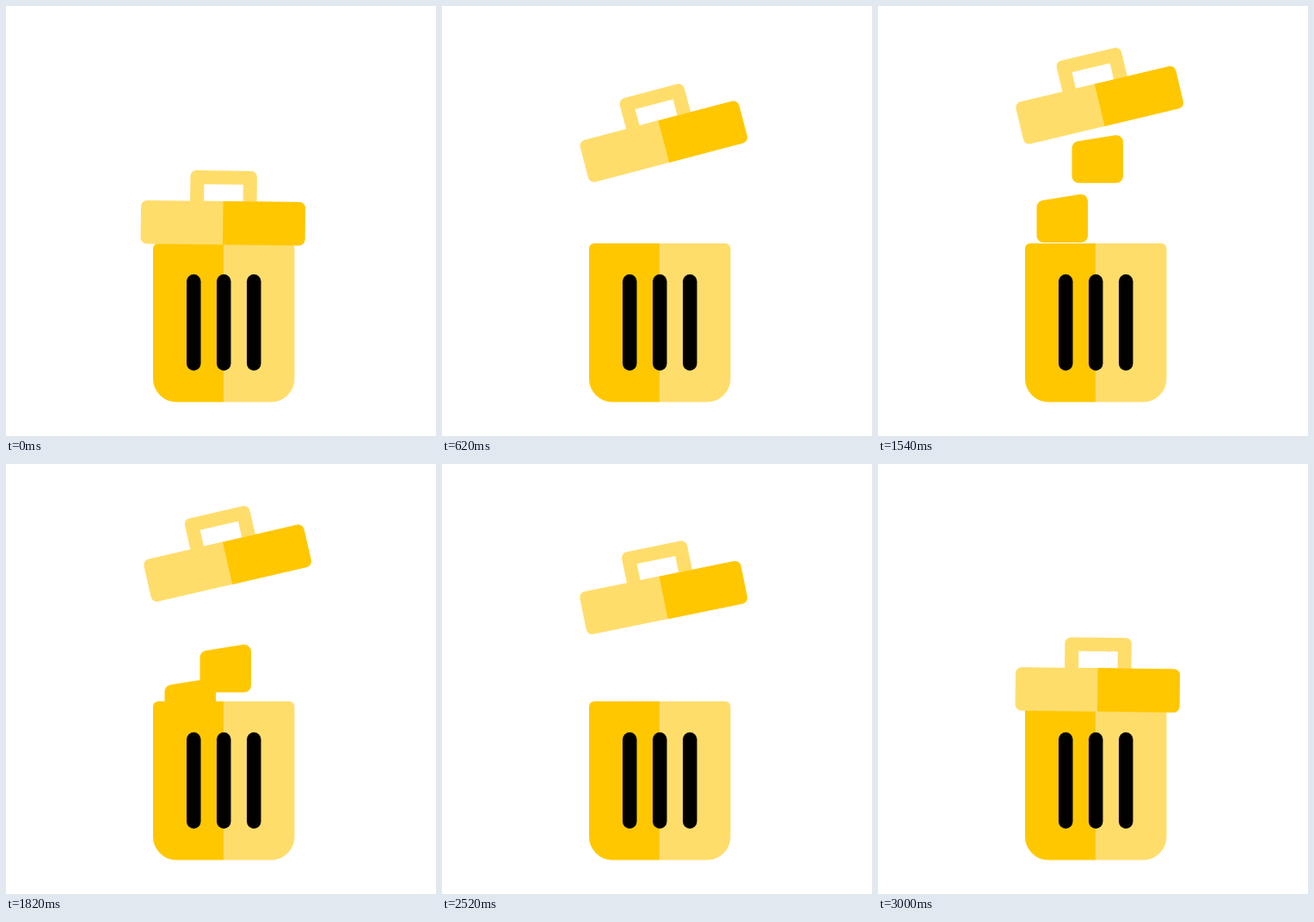
These frames come from a looping animation (500 by 500 pixels, 3580 ms). An HTML page with a canvas:

```html
<!DOCTYPE html>
<html lang="en">
<head>
<meta charset="utf-8">
<title>Bin</title>
<style>
  html, body { margin: 0; width: 100%; height: 100%; overflow: hidden; background: #fff; }
  canvas { display: block; width: 500px; height: 500px; }
</style>
</head>
<body>
<canvas id="stage" width="500" height="500"></canvas>
<script>
const ctx = document.getElementById('stage').getContext('2d');
const LOOP = 3580;
const GOLD = '#ffc700', LIGHT = '#ffdd6b';
const RIM = 276;

// Each scrap waits below the lid, then falls behind the rim between start and end
const scraps = [
  { x: 184.5, top: 159.3, w: 59.5, h: 57.5, start: 1010, end: 2090 },
  { x: 225.5, top: 148.8, w: 59.5, h: 57, start: 1540, end: 2145 },
  { x: 237, top: 174, w: 83, h: 71.5, start: 2100, end: 2460 }
];

// 0 before a, 1 after b, linear between
const ramp = (t, a, b) => Math.min(1, Math.max(0, (t - a) / (b - a)));

function box(x, y, w, h, r, color) {
  ctx.fillStyle = color;
  ctx.beginPath();
  ctx.roundRect(x, y, w, h, r);
  ctx.fill();
}

function drawScrap({ x, top, w, h, start, end }, t) {
  if (t >= end) return;
  const y = top + (RIM + 2 - top) * ramp(t, start, end);
  const left = y + w * 0.16, right = x + w, bottom = y + h, r = h * 0.14;
  ctx.globalAlpha = ramp(t, start - 115, start - 55);
  ctx.fillStyle = GOLD;
  ctx.beginPath();
  ctx.moveTo(x, (left + bottom) / 2);
  ctx.arcTo(x, left, right, y, r);
  ctx.arcTo(right, y, right, bottom, r);
  ctx.arcTo(right, bottom, x, bottom, r);
  ctx.arcTo(x, bottom, x, left, r);
  ctx.closePath();
  ctx.fill();
  ctx.globalAlpha = 1;
}

function drawBin() {
  box(171, RIM, 82.5, 184.5, [6, 0, 0, 27], GOLD);
  box(253.5, RIM, 82, 184.5, [0, 6, 27, 0], LIGHT);
  for (let i = 0; i < 3; i++) box(210 + 35 * i, 312, 16.5, 112, 8.25, '#000');
}

function drawLid(t) {
  const up = ramp(t, 0, 900), down = ramp(t, 2340, 3000);
  const turn = 0.7 - 15.8 * ramp(t, 0, 360) + 3.1 * ramp(t, 360, 2500) + 12.7 * ramp(t, 2500, 3000);
  ctx.save();
  ctx.translate(252.5 + 1.1 * up + 1.9 * down, 234.5 - 136.5 * up + 146.8 * down);
  ctx.rotate(turn * Math.PI / 180);
  // Handle arch
  ctx.fillStyle = LIGHT;
  ctx.beginPath();
  ctx.roundRect(-38.5, -43, 77.5, 38, [7, 7, 0, 0]);
  ctx.rect(-22.5, -27, 45.5, 19.5);
  ctx.fill('evenodd');
  box(-95.5, -7.5, 191, 50.5, 7, LIGHT);
  box(0, -7.5, 95.5, 50.5, [0, 7, 7, 0], GOLD);
  ctx.restore();
}

function frame(ms) {
  const t = ms % LOOP;
  ctx.fillStyle = '#fff';
  ctx.fillRect(0, 0, 500, 500);
  for (const s of scraps) drawScrap(s, t);
  drawBin();
  drawLid(t);
}

let origin = null;
function tick(now) {
  if (origin === null) origin = now;
  frame(now - origin);
  requestAnimationFrame(tick);
}
frame(0);
requestAnimationFrame(tick);
</script>
</body>
</html>
```
